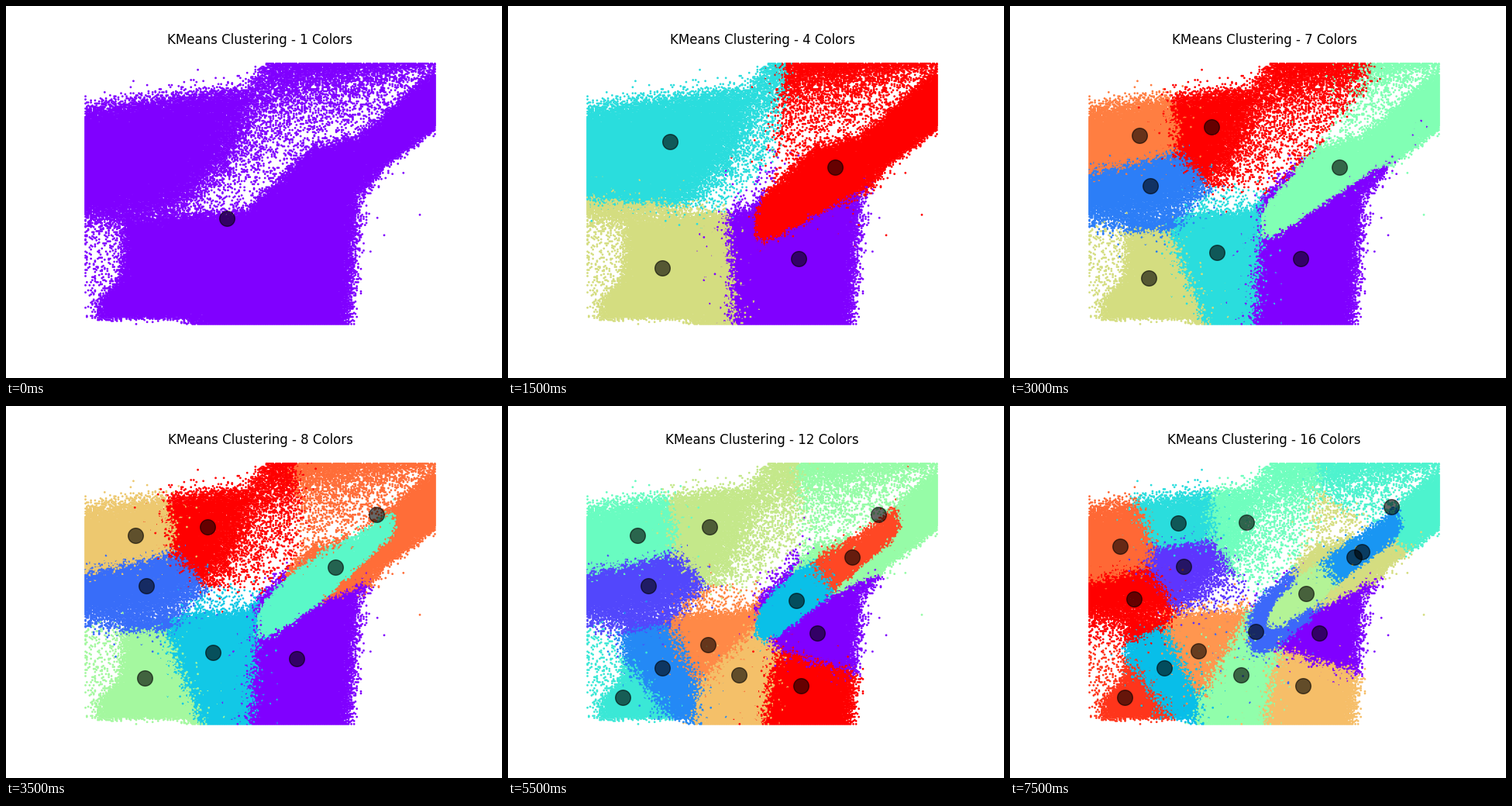
A matplotlib script for the animation above (8000 ms loop, 640x480 px).

```python
import numpy as np
import matplotlib.pyplot as plt
from matplotlib.animation import FuncAnimation

WIDTH, HEIGHT, DPI = 640, 480, 100
LEFT, RIGHT, TOP, BOTTOM = 102.55, 553.45, 74.4, 410.4
RAINBOW = plt.get_cmap("rainbow")
rng = np.random.default_rng(7)

# Key cluster centres by area, in stage pixels.
CENTRES = {
    "all": [(285, 274), (195, 240), (385, 270), (285, 330)],
    "north": [(209, 175), (171, 198), (260, 156), (167, 167), (181, 232),
              (224, 207), (217, 151), (305, 150), (142, 181), (160, 249)],
    "west": [(199, 338), (179, 351), (220, 327), (161, 365), (148, 376)],
    "middle": [(267, 318), (309, 352), (298, 347), (258, 308), (243, 316)],
    "east": [(375, 326), (394, 320), (399, 293), (378, 361)],
    "band": [(425, 208), (444, 195), (359, 260), (372, 251), (382, 242)],
    "corner": [(422, 208), (478, 140), (492, 130), (317, 291), (454, 188)],
}
# Hidden colour channel of the centres; zero elsewhere.
CHANNEL = {"band": 240, "corner": 120}

# Area initial and number of each centre, in label order.
STEPS = [
    "a0",
    "a2 a1",
    "c0 a3 n0",
    "e0 n0 w0 c0",
    "e0 n1 w0 b0 n2",
    "e0 n1 m0 b0 n2 w1",
    "e0 n4 m0 b0 w1 n3 n2",
    "e0 n4 m0 b0 w1 n3 c1 n2",
    "e0 n4 w2 b0 w3 n3 c1 n2 m1",
    "e1 n4 w2 b1 w3 n3 c1 n2 m1 b2",
    "e2 n4 w0 b3 w4 n3 c1 n2 m2 b1 e3",
    "e2 n4 w0 b3 w4 n3 c1 n2 m2 m3 b1 e3",
    "e2 n4 w0 b3 w4 n3 c1 n2 m2 c4 m3 b1 e3",
    "e2 n5 b3 b1 w0 n6 c1 n7 m2 e3 m3 n8 w4 n9",
    "e2 n5 c3 b1 w0 n6 c2 n7 m2 b4 e3 m4 n8 w4 n9",
    "e2 n5 c3 b1 w0 n6 c2 n7 m2 b4 c4 e3 m4 n8 w4 n9",
]


def soft(distance, width):
    """Smooth step from 0 to 1 around a border."""
    return 1 / (1 + np.exp(-np.clip(distance / width, -50, 50)))


def presence(x, y):
    """Chance that a colour at this place occurs."""
    ceiling = np.interp(x, [102, 310, 345], [132, 106, 66])
    roof = np.interp(x, [165, 310, 395, 455, 554], [272, 264, 182, 168, 80])
    left = 150 - 33 * soft(y - 367, 8)
    right = np.interp(y, [150, 160, 210, 250, 410], [575, 555, 485, 455, 443])

    below_ceiling = soft(y - ceiling, 4.5)
    upper_side = 322 - 80 * (np.maximum(y - 100, 0) / 145) ** 2
    upper = below_ceiling * soft(upper_side - x, 10) * soft(275 - y, 6)

    floor = np.maximum(soft(404 - y, 1.2), soft(x - 235, 5))
    lower = soft(y - roof, 3) * soft(x - left, 3) * soft(right - x, 3.5) * floor

    depth = 3 + 0.23 * (560 - x)
    haze = (np.exp((TOP - y) / depth) + 0.05) * below_ceiling
    haze *= soft(x - upper_side, 10) * soft(roof - y, 4) * (x > 235)

    loose = 0.12 * (x < 152) * (y > 265) * soft(385 - y, 4)
    halo = 0.03 * np.exp(-np.maximum(x - right, 0) / 12) * (x > 430) * (y > 200) * (y < 380)

    absent = 1
    for part in (upper, lower, haze, loose, halo):
        absent = absent * (1 - np.clip(part, 0, 1))
    return 1 - absent


def hidden_channel(x, y):
    """Third colour channel: high along the diagonal band, medium in the bright corner."""
    offset = ((y - 204) + 0.77 * (x - 430)) * 0.79
    band = np.exp(-(offset / 28) ** 2) * soft(x - 320, 10) * soft(505 - x, 8)
    above = soft(x - 365, 15) * soft(-20 - offset, 5)
    return 250 * band + 60 * above + 100 * soft(x - 495, 8)


def make_points():
    """All occurring colours of a 256 by 256 grid, in random drawing order."""
    x, y = np.meshgrid(np.linspace(LEFT, RIGHT, 256), np.linspace(BOTTOM, TOP, 256))
    kept = rng.random(x.shape) < presence(x, y)
    return rng.permutation(np.column_stack([x[kept], y[kept]]))


def lookup(names):
    """Centres as rows of x, y and hidden channel."""
    areas = {area[0]: area for area in CENTRES}
    rows = []
    for initial, number in names.split():
        area = areas[initial]
        rows.append((*CENTRES[area][int(number)], CHANNEL.get(area, 0)))
    return np.array(rows, float)


points = make_points()
# Heavy-tailed noise leaves ragged borders between the clusters.
features = np.column_stack([points, hidden_channel(*points.T)])
features += np.clip(rng.standard_t(3, features.shape), -9, 9) * (5, 4, 10)

fig = plt.figure(figsize=(WIDTH / DPI, HEIGHT / DPI), dpi=DPI, facecolor="white")
ax = fig.add_axes([0, 0, 1, 1])
ax.set_xlim(0, WIDTH)
ax.set_ylim(HEIGHT, 0)
ax.axis("off")

dots = ax.scatter(*points.T, s=4, linewidths=0, color=RAINBOW(0.0))
markers = ax.scatter([], [], s=200, c="black", alpha=0.6, zorder=3)
title = ax.text(328, 49.3, "", size=12, ha="center", va="baseline", family="DejaVu Sans")


def update(index):
    centres = lookup(STEPS[index])
    count = len(centres)
    distances = [((features - centre) ** 2).sum(axis=1) for centre in centres]
    labels = np.argmin(distances, axis=0)
    dots.set_facecolors(RAINBOW(labels / max(count - 1, 1)))
    markers.set_offsets(centres[:, :2])
    title.set_text(f"KMeans Clustering - {count} Colors")
    return dots, markers, title


animation = FuncAnimation(fig, update, frames=len(STEPS), interval=500,
                          repeat=True, repeat_delay=0)
plt.show()
```
